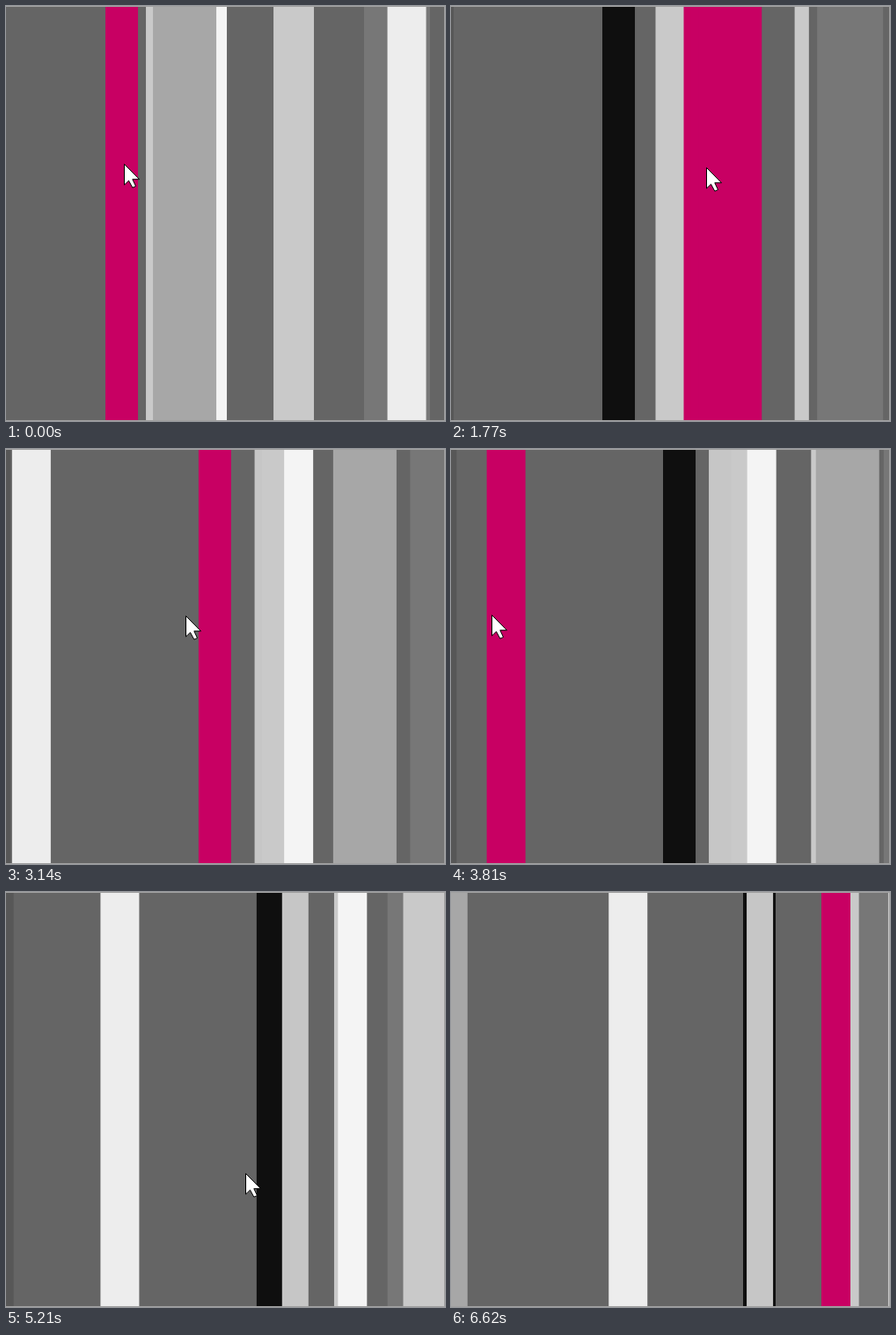
An HTML page with a canvas for the animation above (6720 ms loop, 499x471 px).

```html
<!DOCTYPE html>
<html lang="en">
<head>
<meta charset="utf-8">
<title>Drifting bars</title>
<style>
  html, body { margin: 0; width: 499px; height: 471px; overflow: hidden; background: #656565; }
  canvas { display: block; }
</style>
</head>
<body>
<canvas id="stage" width="499" height="471"></canvas>
<script>
const W = 499, H = 471, LOOP = 6720, LAST = 6620;
const SPAN = 500, HOVER = '#c80063', LAG = 60, EXIT = 5980;
const ctx = document.getElementById('stage').getContext('2d');

// Bars from back to front: start, width, relative speed, colour
const bars = [
  [407, 75, 0.155, '#777777'],
  [113, 37, 1, '#0f0f0f'],
  [232.5, 30, 0.473, '#c6c6c6'],
  [286, 64, 0.963, '#c9c9c9'],
  [248, 56, 1.467, '#656565'],
  [159, 32, 1.245, '#c9c9c9'],
  [218, 33, 0.927, '#f4f4f4'],
  [433.5, 44, 1.524, '#ededed'],
  [-20, 20, 0.05, '#575757'],
  [167, 72, 1.935, '#a7a7a7']
].map(([x, w, speed, color]) => ({ x, w, speed, color }));

// Time, shared drift
const drift = [[0, 0], [1770, 59], [2540, 86], [3810, 128], [4560, 150.5], [5810, 191.5], [LAST, 219]];

// Time, pointer x, pointer y
const pointer = [
  [0, 134.5, 179.5], [1770, 290.5, 183.5], [2430, 415, 188], [2480, 411, 188.5],
  [2540, 391.5, 190.5], [3650, 46.5, 188.5], [4080, 46.5, 189], [4220, 52, 193],
  [4560, 71.5, 200.5], [5650, 408, 400], [5810, 410, 436], [EXIT, 402.5, 472]
];

const arrow = new Path2D('M0 0V23.5L5 18.7L9.3 26.7L13 25L9.3 17.2H17Z');

function at(keys, t) {
  const i = keys.findIndex(k => k[0] >= t);
  if (i < 0) return keys[keys.length - 1].slice(1);
  if (i === 0) return keys[0].slice(1);
  const a = keys[i - 1], b = keys[i], p = (t - a[0]) / (b[0] - a[0]);
  return a.slice(1).map((v, n) => v + (b[n + 1] - v) * p);
}

// A bar leaves on the right, then comes back from the left.
function place(bar, s) {
  return (bar.x + bar.speed * s + bar.w) % (SPAN + 2 * bar.w) - bar.w;
}

function draw(t) {
  const [s] = at(drift, t);
  const hoverTime = Math.min(Math.max(t - LAG, 0), EXIT);
  const [hoverDrift] = at(drift, hoverTime);
  const [hoverX] = at(pointer, hoverTime);

  ctx.fillStyle = '#656565';
  ctx.fillRect(0, 0, W, H);
  for (const bar of bars) {
    const offset = hoverX - place(bar, hoverDrift);
    ctx.fillStyle = offset >= 0 && offset <= bar.w ? HOVER : bar.color;
    ctx.fillRect(place(bar, s), 0, bar.w, H);
  }

  ctx.fillStyle = '#a0a0a0';
  ctx.fillRect(0, 0, W, 1);
  ctx.fillRect(W - 1, 0, 1, H);
  ctx.fillRect(0, H - 1, W, 1);

  if (t >= EXIT) return;
  const [x, y] = at(pointer, t);
  ctx.save();
  ctx.translate(Math.floor(x) + 0.5, Math.floor(y) + 0.5);
  ctx.fillStyle = '#fff';
  ctx.strokeStyle = '#000';
  ctx.fill(arrow);
  ctx.stroke(arrow);
  ctx.restore();
}

const start = performance.now();
function tick() {
  draw(Math.min((performance.now() - start) % LOOP, LAST));
  requestAnimationFrame(tick);
}
tick();
</script>
</body>
</html>
```
